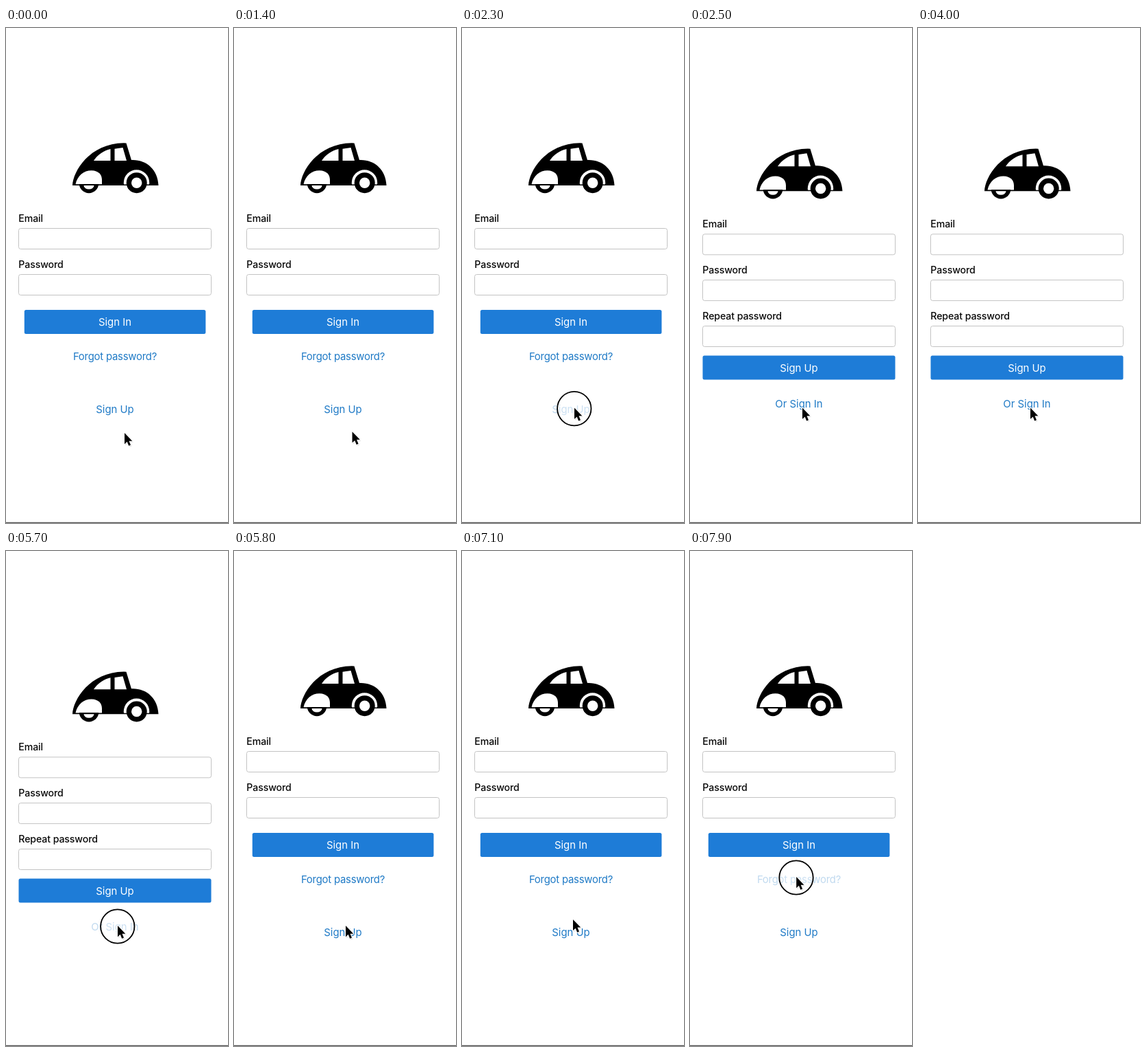
Recreate the animation shown at these times as an HTML page. Size 324 by 720 pixels, loop 8 s.

```html
<!DOCTYPE html>
<html lang="en">
<head>
<meta charset="utf-8">
<title>Sign in</title>
<style>
  html, body { margin: 0; width: 100%; height: 100%; overflow: hidden; background: #fff; }
  svg { display: block; width: 100%; height: 100%; }
  text { font-family: Inter, "Open Sans", sans-serif; }
  .label { font-size: 14.2px; font-weight: 500; letter-spacing: -.13px; fill: #080808; }
  .link, .caption { font-size: 14.9px; text-anchor: middle; }
  .link { fill: #1f7ac6; }
  .caption { fill: #fff; }
  .field { fill: #fff; stroke: #c3c3c3; }
  .button { fill: #1e7cd7; }
  .cut { fill: #fff; }
</style>
</head>
<body>
<svg viewBox="0 0 324 720">
  <defs>
    <clipPath id="above"><rect x="90" y="160" width="140" height="67.5"/></clipPath>
    <clipPath id="below"><rect x="90" y="227" width="140" height="20"/></clipPath>
    <g id="car">
      <path d="M97 229C98 208 122 168 172 167.2L175.5 167.5L183 192C205 191 221.500 206 222.500 229Z"/>
      <path class="cut" d="M128 193C134 184 143 178 152.500 176V193ZM158.500 175.700L170.500 174L176 193H158.500Z"/>
      <path class="cut" d="M101.500 227.300C104 214.500 114 207 125 207.200C135 207.500 140 213 140 221V227.300Z"/>
      <g clip-path="url(#below)">
        <circle cx="121" cy="226" r="14.200"/>
        <path class="cut" d="M113.500 229H128.500A7.500 5.500 0 0 1 113.500 229Z"/>
      </g>
      <circle class="cut" cx="190.500" cy="225" r="18.700" clip-path="url(#above)"/>
      <circle cx="190.700" cy="225.200" r="15"/>
      <circle class="cut" cx="190.700" cy="225.200" r="7.700"/>
    </g>
  </defs>
  <rect width="324" height="720" fill="#fff"/>
  <g id="signIn"></g>
  <g id="signUp"></g>
  <rect y="718.800" width="324" height="1.200" fill="#555"/>
  <circle id="touch" r="24.700" fill="#fff" fill-opacity=".2" stroke="#000" stroke-width="1.800"/>
  <g id="cursor">
    <path d="M1 1.500V18L5 14.500L7.500 20.500L10.500 19.300L8 13.500H13Z" fill="#000" opacity=".14"/>
    <path d="M0 0V16.200L3.700 12.800L6.200 18.800L9 17.600L6.500 11.700H11.300Z"
          stroke="#fff" stroke-width="2.200" stroke-linejoin="round" paint-order="stroke"/>
  </g>
</svg>
<script>
const LOOP = 8000;
const $ = id => document.getElementById(id);

const field = (label, y) =>
  `<text class="label" x="18.300" y="${y - 9.6}">${label}</text>
   <rect class="field" x="18.500" y="${y}" width="281" height="30" rx="3"/>`;

const button = (caption, x, y, w) =>
  `<rect class="button" x="${x}" y="${y}" width="${w}" height="35" rx="2.500"/>
   <text class="caption" x="159" y="${y + 23.2}">${caption}</text>`;

const link = (id, caption, y, spacing = 0) =>
  `<text class="link" id="${id}" x="159" y="${y}" letter-spacing="${spacing}">${caption}</text>`;

$('signIn').innerHTML = `<use href="#car"/>`
  + field('Email', 291.5) + field('Password', 358.5)
  + button('Sign In', 26.8, 410, 264.6)
  + link('forgot', 'Forgot password?', 482.5, -0.23)
  + link('toSignUp', 'Sign Up', 560);

$('signUp').innerHTML = `<use href="#car" y="8.300"/>`
  + field('Email', 299.8) + field('Password', 366.6) + field('Repeat password', 433.5)
  + button('Sign Up', 18.5, 476.5, 281)
  + link('toSignIn', 'Or Sign In', 551.7);

// Pointer moves: start, end, from, to
const moves = [
  [1340, 1790, [173, 589], [164, 552.6]],
  [4450, 5350, [164, 552.6], [163, 545]],
  [7000, 7450, [163, 545], [155.2, 474]]
];

const presses = [
  { id: 'toSignUp', from: 2000, to: 2400 },
  { id: 'toSignIn', from: 5400, to: 5800 },
  { id: 'forgot', from: 7550, to: LOOP }
];

const clamp = v => Math.min(1, Math.max(0, v));
const smooth = v => v * v * (3 - 2 * v);

function pointerAt(t) {
  let pos = moves[0][2];
  for (const [start, end, a, b] of moves) {
    if (t < start) break;
    const k = smooth(clamp((t - start) / (end - start)));
    pos = a.map((v, i) => v + (b[i] - v) * k);
  }
  return pos;
}

const show = (id, on) => $(id).setAttribute('display', on ? 'inline' : 'none');

function render(t) {
  const [x, y] = pointerAt(t);
  const registering = t >= 2400 && t < 5800;
  show('signIn', !registering);
  show('signUp', registering);

  let down = false;
  for (const p of presses) {
    const active = t >= p.from && t < p.to;
    down = down || active;
    $(p.id).setAttribute('opacity', active ? 1 - 0.72 * clamp((t - p.from) / 150) : 1);
  }
  show('touch', down);
  $('touch').setAttribute('cx', x - 0.2);
  $('touch').setAttribute('cy', y + 1);
  $('cursor').setAttribute('transform', `translate(${x} ${y})`);
}

const origin = performance.now();
function tick() {
  render((performance.now() - origin) % LOOP);
  requestAnimationFrame(tick);
}
tick();
</script>
</body>
</html>
```
